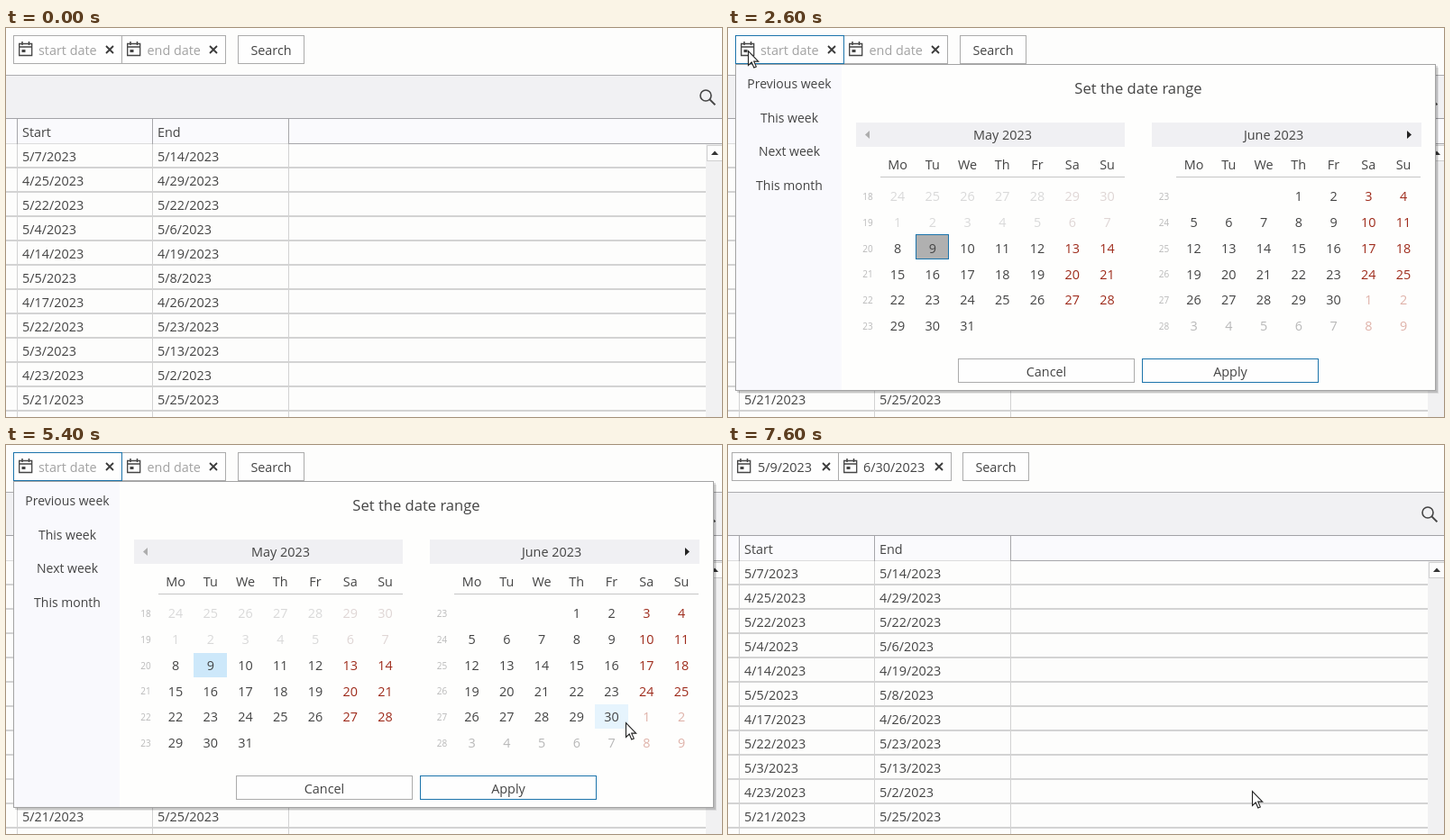
Recreate the animation shown at these times as an HTML page. Size 794 px wide and 432 px high, loop 8000 ms.

```html
<!DOCTYPE html>
<html lang="en">
<head>
<meta charset="utf-8">
<title>Date range picker</title>
<style>
  html, body { margin: 0; width: 100%; height: 100%; overflow: hidden; background: #fdfdfc; }
  svg { display: block; }
  text { font: 14.4px "Open Sans", "Noto Sans", sans-serif; fill: #444; }
  rect { shape-rendering: crispEdges; }
  .mid { text-anchor: middle; }
  .hint { fill: #a2a2a2; }
  .week { font-size: 10px; fill: #b9b9b9; }
  .weekend { fill: #9e2b1b; }
  .past { fill: #d9d9d9; }
  .past.weekend { fill: #dfd6d5; }
  .next { fill: #b8b8b8; }
  .next.weekend { fill: #dfb2a9; }
  .title { font-size: 16.6px; }
  .side { font-size: 14px; }
</style>
</head>
<body>
<svg id="stage" width="794" height="432" viewBox="0 0 794 432"></svg>
<script>
const LOOP = 8000, STEP = 200;
const BLUE = '#1c74ab', GRAY = '#ababab', PICKED = '#cde8fa', HOVER = '#e6f4fd';
const OPEN = 2400, FIRST = 3600, RANGE = 5800, CLOSE = 7400;

const box = (x, y, w, h, fill, attrs = '') =>
  `<rect x="${x}" y="${y}" width="${w}" height="${h}" fill="${fill}" ${attrs}/>`;
const frame = (x, y, w, h, fill, stroke, attrs = '') =>
  box(x + .5, y + .5, w - 1, h - 1, fill, `stroke="${stroke}" ${attrs}`);
const label = (x, y, s, cls = '') => `<text x="${x}" y="${y}" class="${cls}">${s}</text>`;
const path = (d, attrs) => `<path d="${d}" ${attrs}/>`;
const group = (id, body) => `<g id="${id}">${body}</g>`;

// Table
const starts = '5/7 4/25 5/22 5/4 4/14 5/5 4/17 5/22 5/3 4/23 5/21'.split(' ');
const ends = '5/14 4/29 5/22 5/6 4/19 5/8 4/26 5/23 5/13 5/2 5/25'.split(' ');

function table() {
  let s = box(0, 52, 794, 49, '#f1f1f3') + box(0, 52, 794, 1, '#adadb0') +
    box(0, 100, 794, 1, '#a2a2a6') + box(0, 101, 794, 27, '#fafafd') +
    box(0, 128, 313, 1, '#dcdcdc') + box(313, 128, 481, 1, '#a6a6aa') +
    box(776, 129, 18, 303, '#f1f1f2');
  for (const x of [12, 162, 313])
    s += box(x, 101, 1, 28, '#a6a6aa') + box(x, 129, 1, 303, '#d2d2d2');
  s += label(18, 121, 'Start') + label(168, 121, 'End');
  starts.forEach((d, i) => {
    const y = 128 + 27 * i;
    s += box(0, y + 26, 776, 2, '#d3d3d3') +
      label(18, y + 20, d + '/2023') + label(168, y + 20, ends[i] + '/2023');
  });
  return s + frame(777, 130, 18, 18, '#fcfcfc', '#d0d0d0') +
    path('M782 141h8l-4-4.5z', 'fill="#333"') +
    '<circle cx="776" cy="75" r="6" fill="none" stroke="#444" stroke-width="1.6"/>' +
    path('M780.4 79.4l6 6', 'stroke="#444" stroke-width="2"');
}

// Input fields
const calendar = x => `<g transform="translate(${x} 15)" fill="none" stroke="#444">` +
  path('M.7 2.5h14v13H.7zM.7 6h14', 'stroke-width="1.3"') +
  path('M4 0v4M11.5 0v4', 'stroke-width="1.5"') +
  path('M3.5 9h4v3h-4z', 'fill="#444" stroke="none"') + '</g>';
const cross = x => path(`M${x - 4} 20l8 8m0-8l-8 8`, 'stroke="#3a3a3a" stroke-width="1.8"');

function field(x, w, icon, tx, s, cls, cx) {
  return frame(x, 8, w, 32, '#fefefe', GRAY) + calendar(icon) + label(tx, 29.5, s, cls) + cross(cx);
}
const search = x => frame(x, 8, 74, 32, '#fefefe', GRAY) + label(x + 37, 29.5, 'Search', 'mid');

// Calendars
const COL = 38.75, ROW = 28.8;
const cellX = (m, c) => 188 + 328.5 * m + c * COL;
const cellY = r => 187 + r * ROW;
const days = [];
for (let i = 0; i < 38; i++)
  days.push({ m: 0, i, n: i < 7 ? 24 + i : i - 6, cls: i < 14 ? 'past' : '' });
for (let i = 3; i < 42; i++)
  days.push({ m: 1, i, n: i < 33 ? i - 2 : i - 32, cls: i < 33 ? '' : 'next' });
for (const d of days) {
  d.x = cellX(d.m, d.i % 7);
  d.y = cellY(Math.floor(d.i / 7));
}
const live = days.filter(d => !d.cls);
const first = live.find(d => d.n === 9);

function month(m, name, week) {
  const x = m ? 470 : 142;
  let s = box(x, 105, m ? 299 : 298, 27, '#f0f0f3') + label(m ? 605 : 304.5, 123.5, name, 'mid') +
    box(x + 27, 165, 271, 1, '#c6c6c6');
  'Mo Tu We Th Fr Sa Su'.split(' ').forEach((d, c) => s += label(cellX(m, c), 157, d, 'mid'));
  for (let r = 0; r < 6; r++)
    s += label(m ? 483.5 : 155, cellY(r) + 4, week + r, 'mid week');
  return s;
}

const cell = (d, fill) => box(Math.round(d.x - 18.6), Math.round(d.y - 14), 37, 27, fill);

function popup() {
  let s = box(12, 44, 776, 362, '#000', 'opacity=".09"') + box(10, 42, 777, 363, '#000', 'opacity=".14"') +
    frame(8, 40, 777, 363, '#fefefd', '#a3a3a3') + box(9, 41, 117, 361, '#f9f9fd') +
    frame(8, 8, 121, 32, 'none', BLUE);
  ['Previous week', 'This week', 'Next week', 'This month'].forEach((t, i) =>
    s += label(68, 67 + 37.6 * i, t, 'mid side'));
  s += label(455, 73, 'Set the date range', 'mid title') +
    month(0, 'May 2023', 18) + month(1, 'June 2023', 23) +
    path('M157 114v9l-5-4.5z', 'fill="#adadad"') + path('M753 114v9l5-4.5z', 'fill="#222"') +
    group('marks', '');
  for (const d of days)
    s += label(d.x, d.y + 5.2, d.n, `mid ${d.cls} ${d.i % 7 > 4 ? 'weekend' : ''}`);
  return s + frame(255, 367, 196, 27, '#fefefe', GRAY) + label(353, 387, 'Cancel', 'mid') +
    frame(459, 367, 196, 27, '#fefefe', BLUE, 'id="apply"') + label(557, 387, 'Apply', 'mid');
}

const arrow = path('M.5.5v16l3.7-3.5 2.6 6 2.5-1.1-2.6-5.8h5z', 'fill="#fff" stroke="#222" stroke-width="1.1"');

const $ = id => document.getElementById(id);
$('stage').innerHTML = box(0, 0, 794, 432, '#fdfdfc') + table() +
  group('empty', field(8, 121, 14, 36, 'start date', 'hint', 115) +
    field(128, 116, 134, 156.5, 'end date', 'hint', 230) + search(257)) +
  group('filled', field(4, 119, 10, 33, '5/9/2023', '', 109) +
    field(122, 126, 128, 150, '6/30/2023', '', 234) + search(260)) +
  group('popup', popup()) + group('cursor', arrow);

// Pointer route: time, x, y
const route = [
  [1600, 106, 359], [2200, 22, 25], [2800, 22, 25], [3600, 225, 243], [4000, 225, 243],
  [5400, 687, 308], [5600, 678, 304], [5800, 678, 304], [6600, 581, 384], [LOOP, 581, 384]
];

function pointer(t) {
  const k = route.findIndex(p => p[0] > t);
  if (k < 1) return null;
  const [t0, x0, y0] = route[k - 1], [t1, x1, y1] = route[k];
  const u = (t - t0) / (t1 - t0), e = u * u * (3 - 2 * u);
  return { x: x0 + (x1 - x0) * e, y: y0 + (y1 - y0) * e };
}

const show = (id, on) => $(id).setAttribute('display', on ? 'inline' : 'none');

function draw(t) {
  const p = pointer(t), isOpen = t >= OPEN && t < CLOSE;
  show('popup', isOpen);
  show('empty', t < CLOSE);
  show('filled', t >= CLOSE);
  show('cursor', p);
  if (p) $('cursor').setAttribute('transform', `translate(${Math.round(p.x)} ${Math.round(p.y)})`);
  if (!isOpen) return;

  let marks = '';
  const over = live.find(d => Math.abs(p.x - d.x) < 18.6 && Math.abs(p.y - d.y) < 14);
  if (over) marks += cell(over, HOVER);
  if (t >= RANGE) marks += live.filter(d => d.m || d.n > 8).map(d => cell(d, PICKED)).join('');
  else if (t >= FIRST) marks += cell(first, PICKED);
  else marks += frame(208, 229, 37, 28, '#b0b0b0', BLUE);
  $('marks').innerHTML = marks;

  const onApply = p.x > 459 && p.x < 655 && p.y > 367 && p.y < 394;
  $('apply').setAttribute('fill', onApply ? HOVER : '#fefefe');
}

let last = -1;
const begin = performance.now();
function tick() {
  const t = Math.floor((performance.now() - begin) % LOOP / STEP) * STEP;
  if (t !== last) draw(last = t);
  requestAnimationFrame(tick);
}
tick();
</script>
</body>
</html>
```
